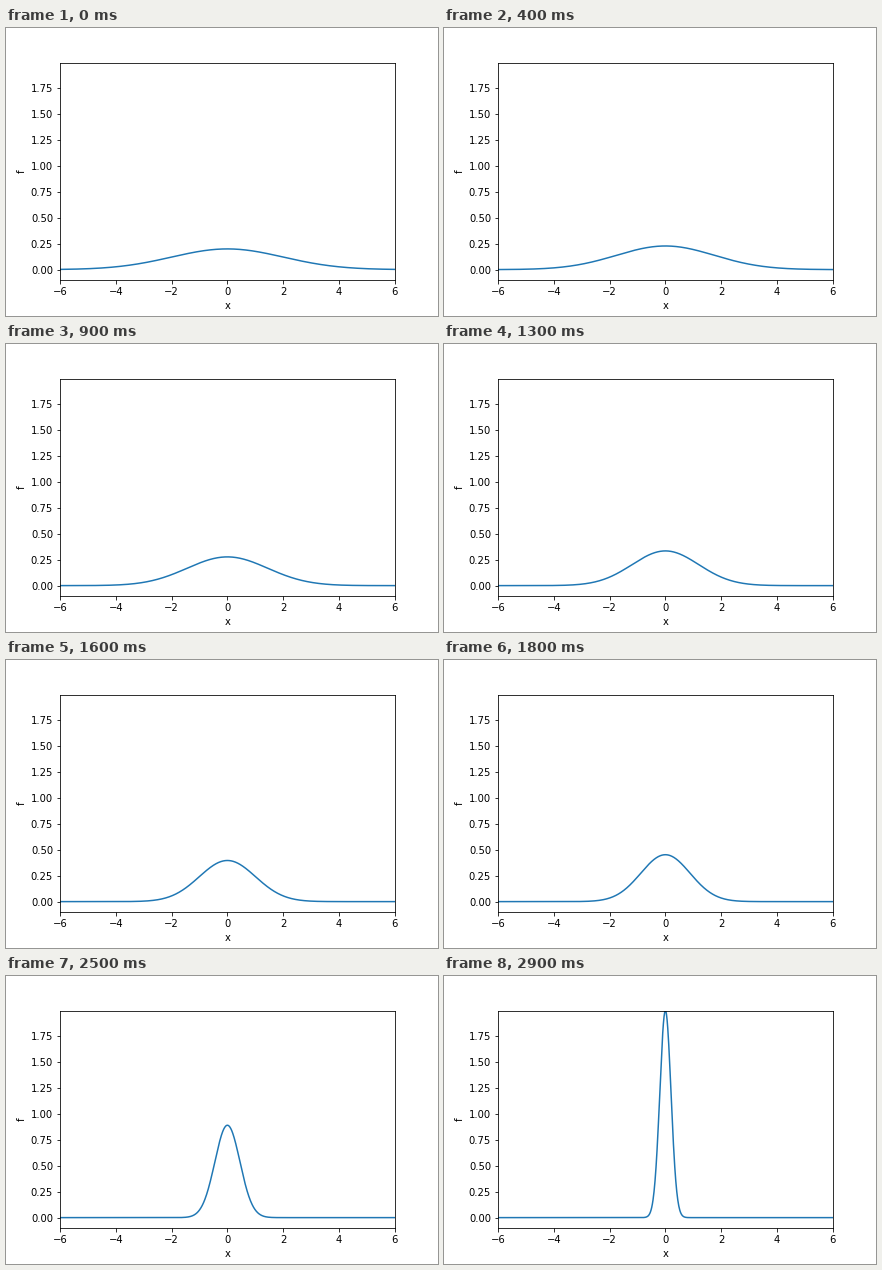
Animation, 432 px wide and 288 px high, one loop 3000 ms. Source, as a matplotlib script:

```python
import numpy as np
import matplotlib.pyplot as plt
from matplotlib.animation import FuncAnimation

FRAMES = 30
INTERVAL = 100
SIGMA_START, SIGMA_END = 2.0, 0.2


def gauss(x, sigma):
    return np.exp(-x**2 / (2 * sigma**2)) / (sigma * np.sqrt(2 * np.pi))


x = np.linspace(-6, 6, 1001)
sigmas = np.linspace(SIGMA_START, SIGMA_END, FRAMES)

plt.rcParams["font.family"] = "DejaVu Sans"
fig, ax = plt.subplots(figsize=(6, 4), dpi=72)
fig.subplots_adjust(left=0.125, right=0.9, bottom=0.125, top=0.88)
ax.set_xlim(-6, 6)
ax.set_ylim(-0.1, gauss(0, SIGMA_END))
ax.set_xlabel("x")
ax.set_ylabel("f")
(line,) = ax.plot(x, gauss(x, sigmas[0]), color="#1f77b4", lw=1.5)


def update(i):
    line.set_ydata(gauss(x, sigmas[i]))
    return (line,)


anim = FuncAnimation(fig, update, frames=FRAMES, interval=INTERVAL,
                     repeat=True, repeat_delay=0)
plt.show()
```
